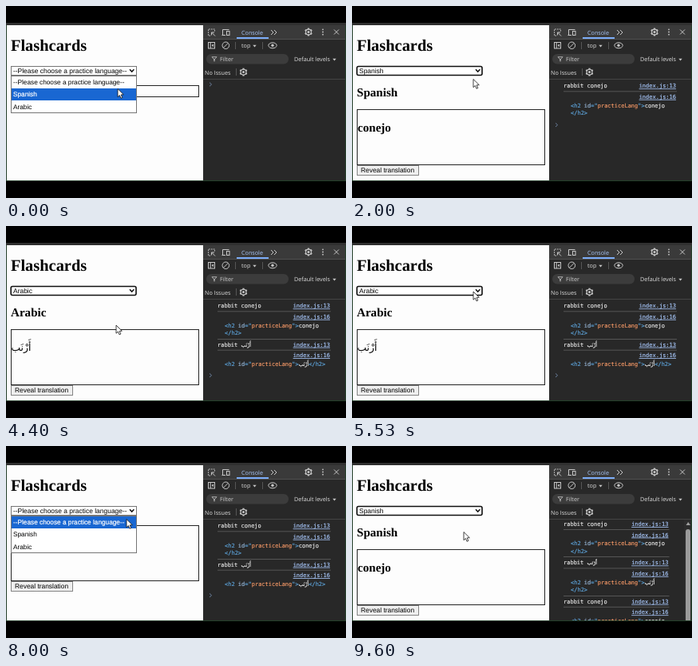
Recreate the animation shown at these times as an HTML page with a canvas. Size 426 px wide and 240 px high, loop 9.67 s.

```html
<!DOCTYPE html>
<html lang="en">
<head>
<meta charset="utf-8">
<title>Flashcards</title>
<style>
  html, body { margin: 0; width: 100%; height: 100%; overflow: hidden; background: #000; }
  canvas { display: block; width: 426px; height: 240px; }
</style>
</head>
<body>
<canvas id="stage" width="426" height="240"></canvas>
<script>
const ctx = document.getElementById('stage').getContext('2d');
ctx.textRendering = 'geometricPrecision';

const LOOP = 9670;
const SANS = '"Liberation Sans", Arial, sans-serif';
const SERIF = '"Liberation Serif", "Times New Roman", serif';
const UI = '"Open Sans", "Noto Sans", sans-serif';
const MONO = '7px "DejaVu Sans Mono", monospace';
const ARABIC = '"DejaVu Sans", "Noto Sans", sans-serif';

const PROMPT = '--Please choose a practice language--';
const OPTIONS = [PROMPT, 'Spanish', 'Arabic'];
const WORDS = ['', 'conejo', 'أَرْنَب'];
const LIST_TOP = 87.8, ROW = 15.3;

// Select state from each time on; a chosen language is also logged.
const STEPS = [
  { at: 0, open: true, choice: 0, word: 0, log: [] },
  { at: 800, open: false, choice: 1, word: 1, log: [1] },
  { at: 2600, open: true, choice: 1, word: 1, log: [1] },
  { at: 3700, open: false, choice: 2, word: 2, log: [1, 2] },
  { at: 5600, open: true, choice: 2, word: 2, log: [1, 2] },
  { at: 6870, open: false, choice: 0, word: 2, log: [1, 2] },
  { at: 7600, open: true, choice: 0, word: 2, log: [1, 2] },
  { at: 8700, open: false, choice: 1, word: 1, log: [1, 2, 1] },
];

// Pointer path: time, x, y
const PATH = [
  [0, 140, 103.5], [500, 141, 109], [1100, 142, 109], [1700, 151, 94],
  [2000, 152, 91.5], [2400, 150, 82], [2700, 150, 82], [3200, 142, 117],
  [3500, 138, 124], [4700, 138, 124], [5400, 152, 82], [5750, 152, 82],
  [6300, 153, 96], [6950, 153, 96], [7400, 151, 82], [7700, 151, 82],
  [8000, 151, 91.5], [8500, 140, 107.5], [9670, 140, 107.5],
];

function pointerAt(t) {
  const i = Math.max(1, PATH.findIndex(p => p[0] >= t));
  const [t0, x0, y0] = PATH[i - 1], [t1, x1, y1] = PATH[i];
  const k = (t - t0) / (t1 - t0), e = k * k * (3 - 2 * k);
  return [x0 + (x1 - x0) * e, y0 + (y1 - y0) * e];
}

function rect(x, y, w, h, color) {
  ctx.fillStyle = color;
  ctx.fillRect(x, y, w, h);
}

function frame(x, y, w, h, color, fill) {
  if (fill) rect(x, y, w, h, fill);
  ctx.strokeStyle = color;
  ctx.lineWidth = 1;
  ctx.strokeRect(x + 0.5, y + 0.5, w - 1, h - 1);
}

function text(str, x, y, font, color, weight = 0) {
  ctx.font = font;
  ctx.fillStyle = color;
  ctx.fillText(str, x, y);
  if (weight) {
    ctx.strokeStyle = color;
    ctx.lineWidth = weight;
    ctx.strokeText(str, x, y);
  }
  return x + ctx.measureText(str).width;
}

const mono = (str, x, y, color) => text(str, x, y, MONO, color, 0.15);

function line(points, color, width = 1) {
  ctx.strokeStyle = color;
  ctx.lineWidth = width;
  ctx.beginPath();
  points.forEach(([x, y]) => ctx.lineTo(x, y));
  ctx.stroke();
}

function circle(x, y, r, color, width = 1) {
  ctx.strokeStyle = color;
  ctx.lineWidth = width;
  ctx.beginPath();
  ctx.arc(x, y, r, 0, Math.PI * 2);
  ctx.stroke();
}

function polygon(points, color) {
  ctx.fillStyle = color;
  ctx.beginPath();
  points.forEach(([x, y]) => ctx.lineTo(x, y));
  ctx.fill();
}

function dot(x, y, r, color) {
  ctx.fillStyle = color;
  ctx.beginPath();
  ctx.arc(x, y, r, 0, Math.PI * 2);
  ctx.fill();
}

function caret(x, y, color) {
  polygon([[x - 2.2, y - 1.3], [x + 2.2, y - 1.3], [x, y + 1.5]], color);
}

function gear(x, y) {
  for (let i = 0; i < 6; i++) {
    const a = (i + 0.5) * Math.PI / 3, c = Math.cos(a), s = Math.sin(a);
    line([[x + c * 3.2, y + s * 3.2], [x + c * 4.9, y + s * 4.9]], '#c7c7c7', 2.2);
  }
  circle(x, y, 3.4, '#c7c7c7', 1.1);
  dot(x, y, 1.5, '#c7c7c7');
}

function drawSelect(state) {
  if (state.open) {
    frame(6, 75, 158, 12, '#767676', '#fff');
  } else {
    ctx.beginPath();
    ctx.roundRect(6.2, 75.5, 156.8, 11, 2);
    ctx.fillStyle = '#fff';
    ctx.fill();
    ctx.strokeStyle = '#101010';
    ctx.lineWidth = 1.6;
    ctx.stroke();
  }
  text(OPTIONS[state.choice], 9, 83.7, '8.45px ' + SANS, '#000');
  line([[155, 79.3], [157.7, 82.1], [160.4, 79.3]], '#111', 1.5);
}

function drawList(state, pointerY) {
  const hovered = pointerY < LIST_TOP ? state.choice
    : Math.min(2, Math.floor((pointerY - LIST_TOP) / ROW));
  frame(6, 87, 158, 47, '#767676', '#fff');
  rect(7, Math.round(LIST_TOP + hovered * ROW), 156, 15, '#1967d2');
  OPTIONS.forEach((label, i) => {
    const on = i === hovered;
    text(label, 9, LIST_TOP + 10.2 + i * ROW, '8.25px ' + SANS, on ? '#fff' : '#000', on ? 0.2 : 0);
  });
}

function drawPage(state, pointerY) {
  rect(0, 24, 247, 195, '#fdfdfd');
  text('Flashcards', 6, 55.8, 'bold 20.4px ' + SERIF, '#000');
  if (state.choice) text(OPTIONS[state.choice], 6, 113, 'bold 15.1px ' + SERIF, '#000');

  const top = state.choice ? 129 : 99;
  const height = state.word ? 70 : 15;
  frame(6, top, 236, height, '#262626');
  if (state.word === 1) text(WORDS[1], 7, top + 28, 'bold 15.1px ' + SERIF, '#000');
  if (state.word === 2) text(WORDS[2], 6.5, top + 26.5, '12.3px ' + ARABIC, '#000');

  frame(6, top + height, 78, 13, '#858585', '#efefef');
  text('Reveal translation', 11, top + height + 9.2, '8.4px ' + SANS, '#000');

  drawSelect(state);
  if (state.open) drawList(state, pointerY);
}

function drawToolbars() {
  const icon = '#c7c7c7', label = '7.2px ' + UI;
  rect(0, 21, 426, 3, '#303030');
  rect(247, 24, 179, 195, '#282828');
  rect(247, 24, 179, 17, '#3a3a3a');
  rect(247, 41, 179, 1, '#505050');

  // Inspect and device icons
  ctx.setLineDash([1.6, 1.2]);
  line([[256, 37], [253.5, 37], [253.5, 29], [261.5, 29], [261.5, 31.5]], icon, 1);
  ctx.setLineDash([]);
  line([[262, 37.5], [257.5, 33], [257.5, 36.5]], icon, 1);
  line([[257.5, 33], [261, 33]], icon, 1);
  line([[275, 36.5], [270.5, 36.5]], icon, 1);
  line([[271.5, 36], [271.5, 29.5], [279.5, 29.5]], icon, 1);
  ctx.strokeRect(276.5, 31.5, 3.5, 5);

  text('Console', 295, 35.7, label, '#a8c7fa');
  rect(289, 39, 40, 2, '#7cacf8');
  for (const x of [332, 336]) line([[x, 30], [x + 3, 33], [x, 36]], icon, 1);
  gear(379, 32.5);
  for (const y of [29.3, 32.5, 35.7]) dot(397, y, 0.9, icon);
  line([[411, 29.5], [417, 35.5]], icon, 1);
  line([[417, 29.5], [411, 35.5]], icon, 1);

  // Context row
  ctx.strokeRect(253.5, 45.5, 8, 7.5);
  line([[256.2, 45.5], [256.2, 53]], icon, 1);
  polygon([[260, 47.3], [260, 51.3], [257.6, 49.3]], icon);
  circle(275.3, 49.3, 4.3, icon, 1);
  line([[278.3, 46.3], [272.3, 52.3]], icon, 1);
  rect(287, 45, 1, 9, '#565656');
  text('top', 295, 52, label, '#dedede');
  caret(311.5, 50, icon);
  rect(321, 45, 1, 9, '#565656');
  ctx.strokeStyle = icon;
  ctx.beginPath();
  ctx.ellipse(334, 49.3, 5.2, 3.5, 0, 0, Math.PI * 2);
  ctx.stroke();
  dot(334, 49.3, 1.7, icon);

  // Filter row
  ctx.fillStyle = '#3c3c3c';
  ctx.beginPath();
  ctx.roundRect(251, 60, 103, 12.5, 6);
  ctx.fill();
  line([[258, 63.7], [264, 63.7], [261, 67], [258, 63.7]], icon, 0.8);
  line([[261, 66.5], [261, 69.3]], icon, 1.2);
  text('Filter', 268, 69, label, '#d0d0d0');
  text('Default levels', 361, 69, label, '#dedede');
  caret(411.5, 67, icon);

  text('No Issues', 249, 85.7, label, '#dedede');
  rect(288, 78, 1, 9, '#565656');
  gear(297.5, 82.6);
  rect(247, 91, 179, 1, '#444');
}

function drawLink(str, right, y) {
  ctx.font = MONO;
  const width = ctx.measureText(str).width;
  mono(str, right - width, y, '#a8c7fa');
  rect(right - width, y + 1, width, 0.8, '#a8c7fa');
}

function drawWord(word, x, y) {
  return word === 2
    ? text(WORDS[2], x, y, '6.2px ' + ARABIC, '#e8e8e8', 0.2)
    : mono(WORDS[word], x, y, '#e8e8e8');
}

function drawEntry(word, y, right, wraps) {
  const x = mono('rabbit ', 265, y, '#e8e8e8');
  drawWord(word, x, y);
  drawLink('index.js:13', right, y);
  rect(265, y + 4, right - 265 + 1, 1, '#555');
  drawLink('index.js:16', right, y + 13.5);

  const parts = [['<h2 ', '#5ea5dc'], ['id', '#9bbbdc'], ['="', '#5ea5dc'],
    ['practiceLang', '#f29766'], ['">', '#5ea5dc']];
  let tagX = 274;
  for (const [str, color] of parts) tagX = mono(str, tagX, y + 24.3, color);
  tagX = drawWord(word, tagX, y + 24.3);
  if (wraps) mono('</h2>', 274, y + 34, '#5ea5dc');
  else mono('</h2>', tagX, y + 24.3, '#5ea5dc');
}

function drawConsole(log) {
  const scrolls = log.length > 2;
  const right = scrolls ? 396.5 : 406;
  ctx.save();
  ctx.beginPath();
  ctx.rect(247, 92, 179, 127);
  ctx.clip();
  let y = scrolls ? 100 : 102.3;
  log.forEach((word, i) => {
    const wraps = word === 1 || scrolls;
    if (i) rect(265, Math.round(y) - 10, right - 264, 1, '#555');
    drawEntry(word, y, right, wraps);
    y += wraps ? 48.4 : 38;
  });
  const mid = y - 2.3 + (log.length ? 0.3 : -2);
  line([[255, mid - 2.3], [257.6, mid], [255, mid + 2.3]], '#7187a8', 0.9);
  if (scrolls) {
    rect(416, 92, 10, 127, '#2c2c2c');
    polygon([[418.5, 99], [424, 99], [421.2, 95]], '#a0a0a0');
    ctx.fillStyle = '#9b9b9b';
    ctx.beginPath();
    ctx.roundRect(418, 104, 6, 120, 3);
    ctx.fill();
  }
  ctx.restore();
}

function drawWindowEdge() {
  const edge = '#24402a';
  rect(0, 24, 1, 195, edge);
  rect(425, 24, 1, 195, edge);
  rect(0, 218, 426, 1, edge);
}

function drawPointer(x, y) {
  ctx.beginPath();
  [[0, 0], [0, 10.2], [2.4, 8], [4, 11.8], [5.8, 11], [4.2, 7.4], [7.3, 7.2]]
    .forEach(([dx, dy]) => ctx.lineTo(x + dx, y + dy));
  ctx.closePath();
  ctx.fillStyle = '#fff';
  ctx.fill();
  ctx.strokeStyle = '#111';
  ctx.lineWidth = 0.8;
  ctx.stroke();
}

function draw(t) {
  const state = STEPS.findLast(step => step.at <= t);
  const [x, y] = pointerAt(t);
  rect(0, 0, 426, 240, '#000');
  drawToolbars();
  drawPage(state, y);
  drawConsole(state.log);
  drawWindowEdge();
  drawPointer(x, y);
}

const start = performance.now();
function tick() {
  draw((performance.now() - start) % LOOP);
  requestAnimationFrame(tick);
}
tick();
</script>
</body>
</html>
```
